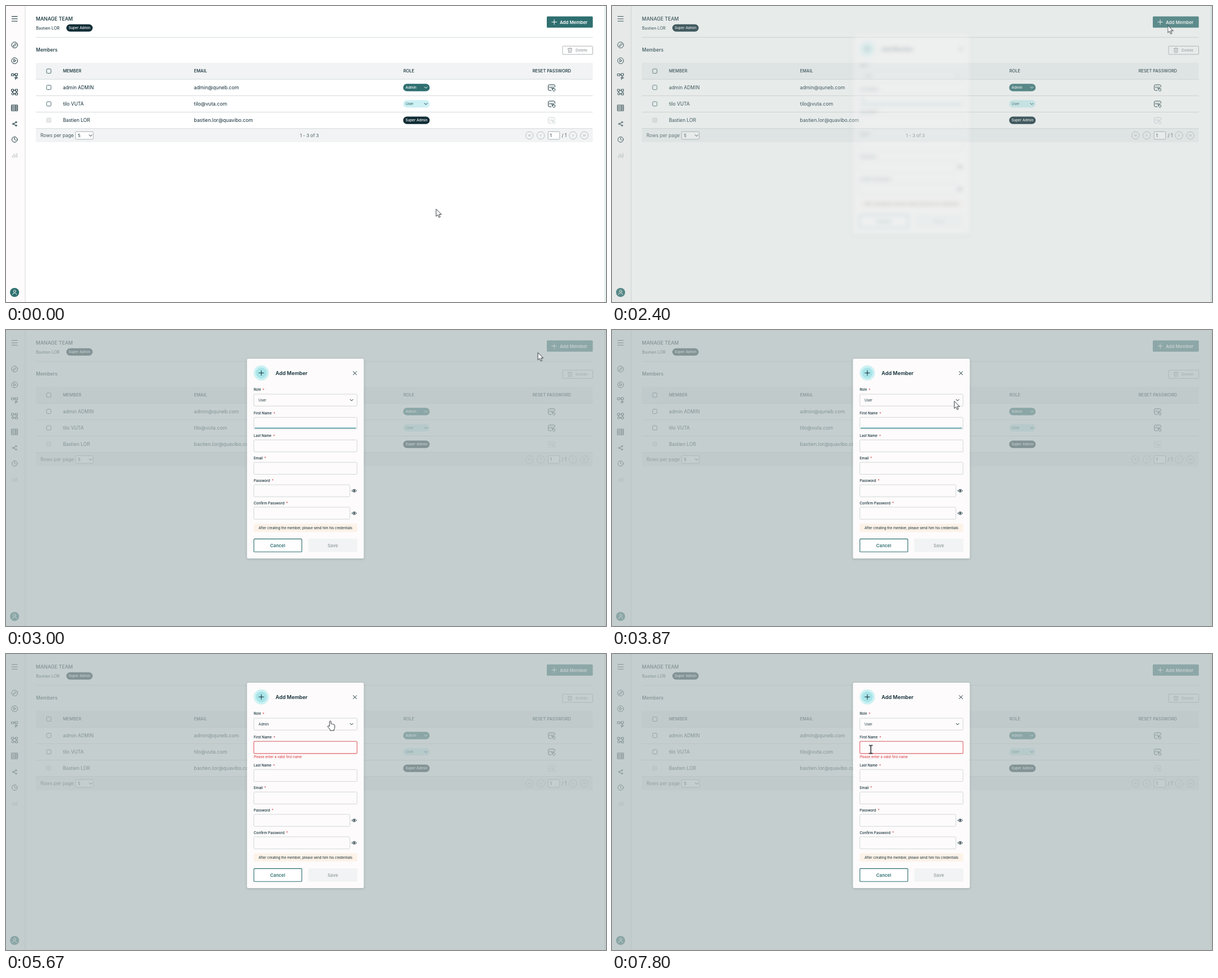
An HTML page that plays this animation: 1064x526 px, repeating every 8000 ms.

```html
<!DOCTYPE html>
<html lang="en">
<head>
<meta charset="utf-8">
<title>Manage team</title>
<style>
html, body { margin: 0; width: 100%; height: 100%; overflow: hidden; background: #fff; }
svg { display: block; }
.stage { width: 1064px; height: 526px; --ink: #0f2c35; --teal: #2f6f70; --grey: #a3a9ab; --head: #f1f3f4; }
text { font: 400 8.4px Inter, "Open Sans", sans-serif; fill: var(--ink); dominant-baseline: central; }
.th text { font-size: 7.5px; font-weight: 500; }
.mail text { font-size: 8.7px; }
text.pill { font-size: 6.3px; font-weight: 500; fill: #fff; }
.soft text { fill: #46585e; }
.mid { text-anchor: middle; }
text.btn { font-size: 7.9px; font-weight: 600; }
text.title { font-size: 9.1px; font-weight: 600; }
.labels text { font-size: 6.2px; font-weight: 500; }
.labels tspan, text.warn { fill: #d8323a; }
text.small { font-size: 6px; }
.line { fill: none; stroke: var(--ink); stroke-width: 1; stroke-linecap: round; stroke-linejoin: round; }
.rule { stroke: #d6dadb; stroke-width: 1; }
.box { fill: #fdfbfb; stroke: #d3d8da; stroke-width: 1; }

.loop, .step { animation-duration: 8s; animation-iteration-count: infinite; animation-timing-function: linear; }
.step { animation-timing-function: step-end; }
.add { animation-name: hover; }
.veil { animation-name: veil; }
.dialog { animation-name: appear; }
.sheet { animation-name: grow; }
.shift { animation-name: shift; }
.focus { animation-name: focus; }
.error { animation-name: error; }
.caret { animation-name: caret; }
.panel { animation-name: panel; }
.is-user { animation-name: is-user; }
.is-admin { animation-name: is-admin; }
.pointer { animation-name: travel; }
.arrow { animation-name: arrow; }
.hand { animation-name: hand; }
.beam { animation-name: beam; }

@keyframes hover { 0%, 16% { fill: #2f6f70; } 19%, 100% { fill: #367576; } }
@keyframes veil {
  0%, 28.75% { opacity: 0; } 30% { opacity: .42; } 30.875% { opacity: .8; } 32.5%, 100% { opacity: 1; }
}
@keyframes appear {
  0%, 28.75% { opacity: 0; filter: blur(5px); }
  30% { opacity: .28; filter: blur(4px); }
  30.875% { opacity: .92; filter: blur(1.1px); }
  31.8%, 100% { opacity: 1; filter: blur(0); }
}
@keyframes grow { 0% { height: 355px; } 49.2%, 100% { height: 365px; } }
@keyframes shift { 0% { transform: none; } 49.2%, 100% { transform: translateY(10px); } }
@keyframes focus { 0% { opacity: 1; } 49.2%, 100% { opacity: 0; } }
@keyframes error { 0% { opacity: 0; } 49.2%, 100% { opacity: 1; } }
@keyframes caret {
  0% { opacity: 0; } 26.75% { opacity: 1; } 33.375% { opacity: 0; } 40% { opacity: 1; } 46.6%, 100% { opacity: 0; }
}
@keyframes panel {
  0% { opacity: 0; } 49.2% { opacity: 1; } 63.4% { opacity: 0; } 79.2% { opacity: 1; } 86.6%, 100% { opacity: 0; }
}
@keyframes is-user { 0% { opacity: 1; } 63.4% { opacity: 0; } 86.6%, 100% { opacity: 1; } }
@keyframes is-admin { 0% { opacity: 0; } 63.4% { opacity: 1; } 86.6%, 100% { opacity: 0; } }
@keyframes arrow { 0% { opacity: 1; } 51.5%, 100% { opacity: 0; } }
@keyframes hand { 0% { opacity: 0; } 51.5% { opacity: 1; } 92%, 100% { opacity: 0; } }
@keyframes beam { 0% { opacity: 0; } 92%, 100% { opacity: 1; } }
@keyframes travel {
  0% { transform: translate(763.5px, 361px); }
  2.5%, 4.5% { transform: translate(601px, 316px); }
  7% { transform: translate(571px, 302px); animation-timing-function: ease-in-out; }
  15%, 15.5% { transform: translate(971.5px, 39.5px); animation-timing-function: ease-out; }
  20.9%, 34.2% { transform: translate(985.5px, 34.5px); }
  35% { transform: translate(979px, 31px); animation-timing-function: ease-in-out; }
  46.6%, 50% { transform: translate(607px, 126.5px); animation-timing-function: ease-in-out; }
  58.4% { transform: translate(495px, 165px); }
  61.6%, 63.4% { transform: translate(515px, 188px); animation-timing-function: ease-out; }
  70.9% { transform: translate(575px, 119px); }
  73.4% { transform: translate(602px, 121px); }
  75.9%, 79.2% { transform: translate(608px, 123px); animation-timing-function: ease-in-out; }
  85.5%, 87% { transform: translate(500px, 155px); animation-timing-function: ease-out; }
  97.5%, 100% { transform: translate(459px, 169.5px); }
}
</style>
</head>
<body>
<svg class="stage" viewBox="0 0 1064 526">
  <defs>
    <path id="chevron" d="M-2.5-1.3 0 1.3 2.5-1.3" class="line"/>
    <g id="reset" class="line">
      <path d="M967 150h-3.5a1.8 1.8 0 0 1-1.8-1.8v-6.4a1.8 1.8 0 0 1 1.8-1.8h8a1.8 1.8 0 0 1 1.8 1.8v2"/>
      <path d="M963.8 143.5l1.8 2m0-2l-1.8 2m3.4-2l1.6 2m0-2l-1.6 2m3.3-1.8h.4" stroke-width=".8"/>
      <path d="M968.2 146.5l2 1.4v-2.6q.8-1 1.6 0v1.6l1.8.7v2.5q-.5 1.2-2.6 1.2-1.4-1-2.8-4.8z" stroke-width=".9"/>
    </g>
    <g id="eye">
      <path class="line" d="M-4 0Q0-5 4 0 0 5-4 0z"/>
      <circle r="1.4" fill="#0f2c35"/>
    </g>
    <g id="pager" fill="none" stroke="#b9bfc1"><circle r="6.7"/></g>
  </defs>

  <rect width="1064" height="526" fill="#fff"/>
  <rect x="1061" width="3" height="526" fill="#e6eff0"/>
  <rect width="34" height="526" fill="#fdfbfb"/>
  <path class="rule" d="M34 0V526" stroke-width="1.2"/>

  <!-- Sidebar icons -->
  <path class="line" d="M10.3 18.5h9.8M10.3 22.8h9.8M10.3 27h9.8" stroke-width="1.6"/>
  <g class="line" stroke-width=".95">
    <circle cx="15.3" cy="69.3" r="5.3"/><path d="M13 71.7l.5-2 3.4-3.3 1.4 1.4-3.4 3.4z"/>
    <circle cx="15.3" cy="97.3" r="5.3"/><path d="M13.8 95v4.6l3.6-2.3z"/>
    <path d="M10 120.5h4v3.5h-4zM16.5 120h4v3.5h-4zM14 122h2.5M18 123.5v3M16.5 126.5h3.5v2h-3.5zM17 128.5v2.2"/>
    <path d="M10 148h3.5v3.5H10zM17 148h3.5v3.5H17zM13.5 149.8H17M11.8 151.5v2.5M18.8 151.5v2.5M17 154.5h3.5v3.5H17z"/>
    <circle cx="12" cy="156" r="2"/><path d="M14 156h3"/>
    <path d="M10 176h10.6v10.2H10zM10 179.4h10.6M10 182.8h10.6M12 177.7h1M12 181.1h1M12 184.5h1M15.5 177.7h3M15.5 181.1h3M15.5 184.5h3"/>
    <circle cx="12.6" cy="209.5" r="1.2"/><circle cx="17.8" cy="206.6" r="1.2"/><circle cx="17.8" cy="212.4" r="1.2"/>
    <path d="M13.7 209l3-1.8M13.7 210l3 1.8"/>
    <circle cx="15.3" cy="237.3" r="4.8"/><path d="M15.3 234.3v3l2 1.4"/>
    <path d="M11.5 269v-3M14.2 269v-6.5M16.9 269v-4.5M19.4 269v-7" stroke="#b4babc"/>
  </g>
  <circle cx="15.2" cy="509" r="8.1" fill="#2f6f70"/>
  <g class="line" style="stroke:#e6f3f3" stroke-width=".9"><circle cx="15.2" cy="506.8" r="2.1"/><path d="M11.6 513q.2-3.2 3.6-3.2t3.6 3.2"/></g>

  <!-- Page header -->
  <text x="53" y="23" style="font-size:8.7px;font-weight:500">MANAGE TEAM</text>
  <text x="53.3" y="39.3" style="font-size:7.3px">Bastien LOR</text>
  <rect x="107" y="32.5" width="46.7" height="13" rx="6.5" fill="#0f2c35"/>
  <text class="pill mid" x="130.3" y="39">Super Admin</text>
  <path class="rule" d="M53 55.7H1040.5"/>
  <rect class="add loop" x="959" y="18.5" width="81.6" height="20" rx="1.5"/>
  <path class="line" d="M968 28.5h8.4M972.2 24.3v8.4" style="stroke:#fff" stroke-width="1.4"/>
  <text class="btn" x="982" y="28.5" style="fill:#fff">Add Member</text>

  <text x="53.3" y="78.3" style="font-weight:500">Members</text>
  <rect x="987" y="71.3" width="53.4" height="14.7" rx="1" fill="#fff" stroke="#adb2b4"/>
  <path class="line" d="M996 76h8M998.5 76v-1.4h3V76M997 76l.4 6.6h5.2l.4-6.6M999 78.5v2.3M1001 78.5v2.3" style="stroke:#a3a9ab" stroke-width=".9"/>
  <text class="btn" x="1010" y="78.7" style="font-size:6.8px;fill:#a3a9ab">Delete</text>

  <!-- Member table -->
  <rect x="53" y="101" width="987.5" height="29" fill="#f1f3f4"/>
  <rect x="53" y="218" width="987.5" height="24" fill="#f1f3f4"/>
  <path class="rule" d="M53 130.2H1040.5M53 159.4H1040.5M53 188.6H1040.5M53 217.7H1040.5"/>
  <g fill="none" stroke="#47696f">
    <rect x="72" y="111.8" width="7.8" height="7.8" rx="1.6"/>
    <rect x="72" y="140.8" width="7.8" height="7.8" rx="1.6"/>
    <rect x="72" y="170" width="7.8" height="7.8" rx="1.6"/>
    <rect x="72" y="199" width="7.8" height="7.8" rx="1.6" fill="#e7e9ea" stroke="#d5d9da"/>
  </g>
  <g class="th">
    <text x="101" y="115.8">MEMBER</text><text x="333.5" y="115.8">EMAIL</text>
    <text x="704.7" y="115.8">ROLE</text><text class="mid" x="967.8" y="115.8">RESET PASSWORD</text>
  </g>
  <text x="101" y="144.6">admin ADMIN</text>
  <text x="101" y="173.8">tilo VUTA</text>
  <text x="101" y="203">Bastien LOR</text>
  <g class="mail">
    <text x="333.3" y="144.6">admin@quneb.com</text>
    <text x="333.3" y="173.8">tilo@vuta.com</text>
    <text x="333.3" y="203">bastien.lor@quavibo.com</text>
  </g>
  <rect x="704.3" y="138.3" width="47" height="13.2" rx="6.6" fill="#2f6f70"/>
  <rect x="704.3" y="167.3" width="47" height="13.2" rx="6.6" fill="#cdf1f4"/>
  <rect x="704.3" y="196.5" width="47" height="13.2" rx="6.6" fill="#0f2c35"/>
  <text class="pill" x="708.5" y="144.9">Admin</text>
  <text class="pill" x="708.5" y="173.9" style="fill:#24505a;font-weight:400">User</text>
  <text class="pill mid" x="727.8" y="203.1">Super Admin</text>
  <path class="line" d="M742 143.6l2.5 2.6 2.5-2.6" style="stroke:#fff" stroke-width="1.2"/>
  <use href="#chevron" x="744.5" y="174"/>
  <use href="#reset"/>
  <use href="#reset" y="29"/>
  <use href="#reset" y="58.2" opacity=".22"/>

  <!-- Pagination -->
  <g class="soft">
    <text x="61" y="230.2">Rows per page</text>
    <text class="mid" x="538" y="230.2" style="font-size:8px">1 - 3 of 3</text>
    <text x="985.5" y="230.2">/ 1</text>
  </g>
  <g fill="#fff" stroke="#a9b0b2"><rect x="123.3" y="223.3" width="31.4" height="13.6" rx="1.5"/><rect x="961.3" y="223.3" width="20.5" height="13.6" rx="1.5"/></g>
  <text x="127.5" y="230.2" style="font-size:7.5px">5</text>
  <text x="964.7" y="230.2" style="font-size:7.5px">1</text>
  <use href="#chevron" x="150" y="230.2" stroke-width="1.4"/>
  <use href="#pager" x="928.3" y="230"/><use href="#pager" x="948.3" y="230"/>
  <use href="#pager" x="1005.5" y="230"/><use href="#pager" x="1025.5" y="230"/>
  <path class="line" d="M927.9 228.4l-1.6 1.6 1.6 1.6m2.4-3.2l-1.6 1.6 1.6 1.6M949 228.4l-1.6 1.6 1.6 1.6M1004.8 228.4l1.6 1.6-1.6 1.6M1023.6 228.4l1.6 1.6-1.6 1.6m2.4-3.2l1.6 1.6-1.6 1.6" style="stroke:#adb4b6" stroke-width=".9"/>

  <rect class="veil loop" width="1064" height="526" fill="rgba(175,188,187,.72)"/>

  <!-- Dialog -->
  <g class="dialog loop">
    <rect class="sheet step" x="427.3" y="51" width="207.2" height="355" rx="2.5" fill="#fdfbfb" style="filter:drop-shadow(0 1px 2px #24404440)"/>
    <circle cx="452.8" cy="76.3" r="13.5" fill="#cdf1f3"/>
    <circle cx="452.8" cy="76.3" r="9.6" fill="#a8e4e8"/>
    <path class="line" d="M448.5 76.3h8.6M452.8 72v8.6" stroke-width="1.1"/>
    <text class="title" x="478" y="76.5">Add Member</text>
    <path class="line" d="M615.7 73.7l6 6m0-6l-6 6" stroke-width="1.4"/>

    <g class="labels">
      <text x="439.2" y="105.8">Role<tspan dx="3">*</tspan></text>
      <text x="439.2" y="147.6">First Name<tspan dx="3">*</tspan></text>
    </g>
    <rect class="box" x="439.5" y="114" width="183" height="21.2" rx="1.5"/>
    <text class="small is-user step" x="448" y="124.4">User</text>
    <text class="small is-admin step" x="448" y="124.4">Admin</text>
    <use href="#chevron" x="612.8" y="124.7" stroke-width="1.5"/>
    <rect class="box" x="439.5" y="155.3" width="183" height="21" rx="1.5"/>
    <path class="focus step" d="M441 174.3H620.5" stroke="#1f8288" stroke-width="1.3"/>
    <path class="caret step" d="M445.5 161V170" stroke="#0f2c35" stroke-width=".8"/>
    <g class="error step">
      <rect x="439.5" y="155.3" width="183" height="21.6" rx="1.5" fill="#fdfbfb" stroke="#e0636a" stroke-width="1.1"/>
      <text class="small warn" x="439.2" y="182.5">Please enter a valid first name</text>
    </g>

    <g class="shift step">
      <g class="labels">
        <text x="439.2" y="187.5">Last Name<tspan dx="3">*</tspan></text>
        <text x="439.2" y="227">Email<tspan dx="3">*</tspan></text>
        <text x="439.2" y="267">Password<tspan dx="3">*</tspan></text>
        <text x="439.2" y="307">Confirm Password<tspan dx="3">*</tspan></text>
      </g>
      <g class="box">
        <rect x="439.5" y="195.3" width="183" height="21.3" rx="1.5"/>
        <rect x="439.5" y="235.2" width="183" height="21.3" rx="1.5"/>
        <rect x="439.5" y="275" width="170.3" height="21.3" rx="1.5"/>
        <rect x="439.5" y="314.9" width="170.3" height="21.3" rx="1.5"/>
      </g>
      <use href="#eye" x="617.5" y="285.7"/><use href="#eye" x="617.5" y="325.6"/>
      <rect x="439.3" y="344.3" width="183.5" height="14.4" rx="1.5" fill="#fdf2e8"/>
      <text class="small mid" x="531" y="351.4">After creating the member, please send him his credentials</text>
      <rect x="439.6" y="371.4" width="85" height="22.8" rx="1" fill="#fff" stroke="#2f6f70" stroke-width="1.1"/>
      <text class="btn mid" x="481.8" y="382.8" style="fill:#2f6f70">Cancel</text>
      <rect x="536.3" y="371" width="86.5" height="23.5" rx="1" fill="#f1f3f4"/>
      <text class="btn mid" x="579.5" y="382.8" style="fill:#9da4a7">Save</text>
    </g>

    <g class="panel step">
      <rect class="box" x="439.5" y="135.5" width="183" height="72" rx="1.5"/>
      <text class="small" x="448" y="153">User</text>
      <text class="small" x="448" y="189">Admin</text>
    </g>
  </g>

  <!-- Mouse pointer -->
  <g class="pointer loop" fill="#fff" stroke="#1c2326" stroke-width=".9" stroke-linejoin="round">
    <path class="arrow step" d="M0 0V13L3 10.3 5.2 15 7.3 14 5.2 9.5H9.5z"/>
    <path class="hand step" d="M-1.3 9.5V1Q-1 0 0 0T1.3 1V5.2Q2.6 4.6 3.6 5.7 5 5.2 5.8 6.4 7.6 6 7.9 7.6V12Q7.6 14 6.6 15V17H-.3V15.4L-4.3 10.3Q-4.8 8.6-3.2 8.5z"/>
    <path class="beam step" d="M-3.3-7H-1Q0-7 0-6 0-7 1-7H3.3M0-6V6.6M-3.3 7.3H-1Q0 7.3 0 6.3 0 7.3 1 7.3H3.3" fill="none" stroke-width="1.4"/>
  </g>
</svg>
</body>
</html>
```
